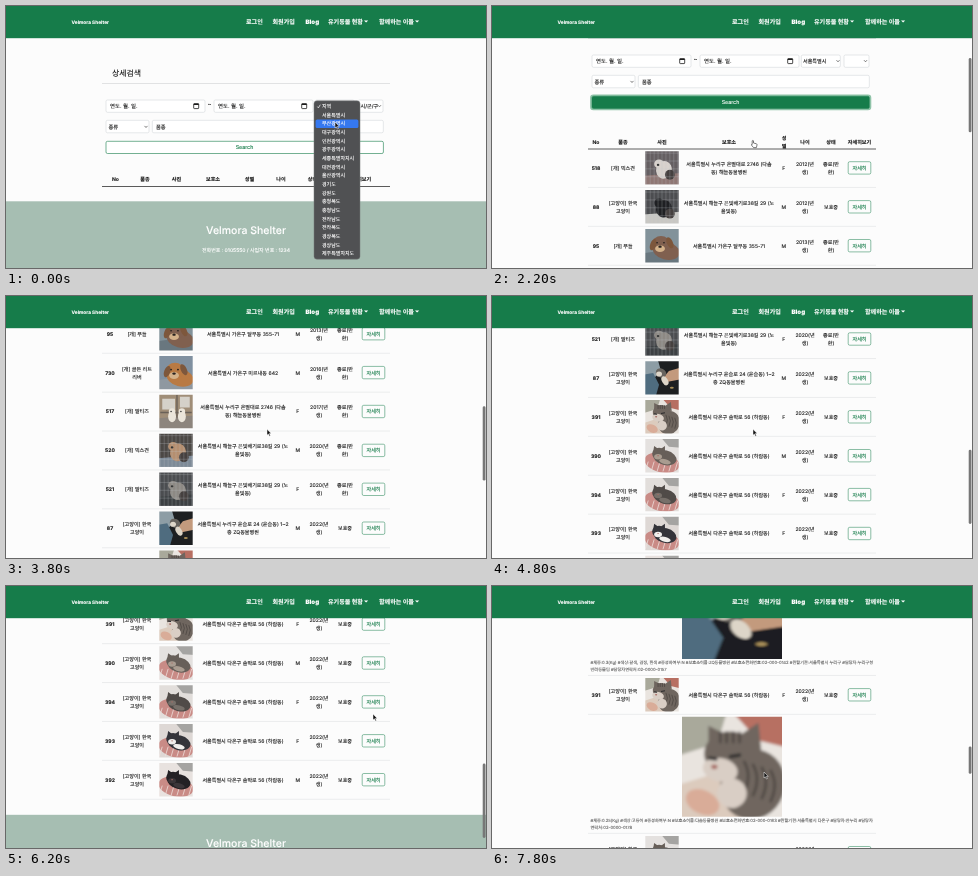
An HTML page that plays this animation: 480x262 px, repeating every 8000 ms.

```html
<!DOCTYPE html>
<html lang="ko">
<head>
<meta charset="utf-8">
<title>상세검색</title>
<style>
html, body { margin: 0; width: 100%; height: 100%; overflow: hidden; background: #fcfcfc; }
svg { display: block; }
#stage { width: 100vw; height: 100vh; }
text {
  font-family: Inter, "Noto Sans CJK KR", "Noto Sans CJK JP", "Noto Sans CJK", sans-serif;
  fill: currentColor; stroke: currentColor; stroke-width: 0.12px;
  text-rendering: geometricPrecision; white-space: pre;
}
</style>
</head>
<body>
<script>
const LOOP = 8000, STEP = 200;
const GREEN = '#167c4a', INK = '#1c1c1c', BORDER = '#d3d7db';
const ROW = 38.9, FIRST_ROW = 207;

// ---------- drawing helpers ----------
function el(parent, tag, attrs = {}, content) {
  const node = document.createElementNS('http://www.w3.org/2000/svg', tag);
  for (const key in attrs) node.setAttribute(key, attrs[key]);
  if (content !== undefined) node.textContent = content;
  parent.appendChild(node);
  return node;
}
const group = (parent, y = 0) => el(parent, 'g', { transform: `translate(0 ${y})` });
const box = (parent, x, y, w, h, fill, more = {}) =>
  el(parent, 'rect', { x, y, width: w, height: h, fill, ...more });
const path = (parent, d, fill, more = {}) => el(parent, 'path', { d, fill, ...more });
const oval = (parent, cx, cy, rx, ry, fill, angle = 0) =>
  el(parent, 'ellipse', { cx, cy, rx, ry, fill, transform: `rotate(${angle} ${cx} ${cy})` });
const stroke = (parent, d, color, width, more = {}) =>
  path(parent, d, 'none', { stroke: color, 'stroke-width': width, ...more });
const rule = (parent, y, color, width = 0.5) => stroke(parent, `M96 ${y}H384`, color, width);

function label(parent, x, y, content, size = 5.1, more = {}) {
  return el(parent, 'text', { x, y, dy: '.36em', 'font-size': size, color: INK, ...more }, content);
}
function centered(parent, x, y, content, size = 5.1, more = {}) {
  const lines = content.split('\n');
  lines.forEach((line, i) =>
    label(parent, x, y + (i - (lines.length - 1) / 2) * 8, line, size, { 'text-anchor': 'middle', ...more }));
}
const field = (parent, x, y, w, h) =>
  box(parent, x, y, w, h, '#fff', { rx: 1.5, stroke: BORDER, 'stroke-width': 0.6 });
const chevron = (parent, x, y) => stroke(parent, `M${x - 1.5} ${y - 0.8}l1.5 1.6 1.5-1.6`, '#444', 0.7);
const show = (node, on) => node.setAttribute('visibility', on ? 'visible' : 'hidden');
const moveTo = (node, x, y) => node.setAttribute('transform', `translate(${x} ${y})`);

// ---------- photos, drawn in a 34 x 34 space ----------
const scenes = {
  cage(p, fur, floor) {
    path(p, 'M-4 25L38 22V38H-4Z', floor);
    oval(p, 19, 19, 8, 9, fur, 15);
    oval(p, 14, 13, 5, 4.5, fur);
    oval(p, 25, 24, 5, 5, '#45403f');
    oval(p, 13, 14, 1.3, 1.1, '#222');
    for (let i = 1; i < 34; i += 4)
      stroke(p, `M${i} 0V34M0 ${i * 2}H34`, '#c3c6c9', 0.5, { opacity: 0.5 });
  },
  dog(p, fur, floor) {
    path(p, 'M-4 25L38 19V38H-4Z', floor);
    oval(p, 21, 22, 14, 9, fur, 15);
    oval(p, 16, 15, 9, 8, fur);
    oval(p, 8, 16, 3, 6, '#7d573c', 20);
    oval(p, 25, 14, 3, 6, '#7d573c', -25);
    oval(p, 15, 20, 5, 3.5, '#d4b28a');
    oval(p, 15, 18, 1.7, 1.2, '#28221f');
    oval(p, 12, 14, 1, 0.8, '#28221f');
    oval(p, 19, 14, 1, 0.8, '#28221f');
  },
  pair(p, fur, floor) {
    path(p, 'M-4 24L38 21V38H-4Z', floor);
    path(p, 'M3 4H16V15H3ZM21 2H31V13H21Z', '#d5d1c9');
    stroke(p, 'M18 0V23M1 18H33', '#6a6158', 1.4);
    for (const x of [13, 23]) {
      oval(p, x, 22, 4, 6, fur);
      oval(p, x, 17, 3.3, 3.2, fur);
      oval(p, x - 1, 17, 0.8, 0.7, '#333');
    }
  },
  held(p, fur, hand) {
    path(p, 'M-4 -4H12L16 10 8 18 -4 14Z', '#8d9da5');
    path(p, 'M-4 14L8 12 14 24 10 38H-4Z', '#4f6c7f');
    path(p, 'M38 6L24 10 19 16 23 21 38 18Z', hand);
    oval(p, 16, 12, 5.5, 4.5, '#67635e', 25);
    oval(p, 14, 13, 3, 2.6, fur);
    oval(p, 20, 20, 3, 5, fur, -30);
    oval(p, 27, 27, 2, 1, '#a98f58');
  },
  kitten(p, fur, pale) {
    path(p, 'M-4 -4H16L12 9 -4 14Z', '#a9a99b');
    path(p, 'M15 -4H38V11L26 8Z', '#b76f62');
    path(p, 'M-4 24L12 19 24 38H-4Z', '#dccbbd');
    oval(p, 24, 23, 11, 12, fur, 20);
    path(p, 'M9 12L9 3 15 6ZM20 6L26 2 27 12Z', fur);
    oval(p, 17, 13, 9.5, 8, fur, 10);
    for (let i = 0; i < 4; i++)
      stroke(p, `M${21 + i * 3} ${15 + i}q3 5 0 11M${13 + i * 2.2} 5v4`, '#34302d', 0.8, { opacity: 0.6 });
    oval(p, 13, 18, 6, 4, pale, 12);
    oval(p, 17, 26, 5, 5, pale, 25);
    stroke(p, 'M9 14l3 .4M16 13.6l4-.7', '#2b2a2c', 1.1);
    oval(p, 11, 17, 1.1, 0.8, '#a76d66');
    oval(p, 7, 29, 6, 4, '#d9ac98', 25);
  },
  curled(p, fur, pale) {
    path(p, 'M14 -4H38V9L24 8Z', '#a5a4a2');
    oval(p, 17, 24, 18, 10, '#c98b86', 12);
    for (let i = 0; i < 6; i++) stroke(p, `M${i * 6} 33l3-10`, '#efe0dc', 1, { opacity: 0.8 });
    oval(p, 20, 19, 12, 7.5, fur, 14);
    path(p, 'M8 13L9 7 13 10ZM16 10L20 7 20 14Z', fur);
    oval(p, 14, 15, 7, 6, fur);
    oval(p, 13, 18, 4, 2.8, pale);
    oval(p, 20, 23, 6, 2.5, pale, 14);
    oval(p, 13, 17, 0.8, 0.6, '#a76d66');
  }
};
function photo(parent, x, y, w, h, [scene, back, ...colors]) {
  const frame = el(parent, 'svg', { x, y, width: w, height: h, viewBox: '0 0 34 34', preserveAspectRatio: 'none' });
  const picture = el(frame, 'g', { filter: 'url(#soft)' });
  box(picture, -4, -4, 42, 42, back);
  scenes[scene](picture, ...colors);
}

// ---------- content ----------
const regions = ['지역', '서울특별시', '부산광역시', '대구광역시', '인천광역시', '광주광역시', '세종특별자치시',
  '대전광역시', '울산광역시', '경기도', '강원도', '충청북도', '충청남도', '전라남도', '전라북도', '경상북도',
  '경상남도', '제주특별자치도'];
const places = {
  haeneul: '서울특별시 누리구 온별대로 2746 (다솜\n동) 해늘동물병원',
  noeul: '서울특별시 해늘구 은빛배기로38길 29 (노\n을빛동)',
  dalmu: '서울특별시 가온구 달무동 355-71',
  mirnae: '서울특별시 가온구 미르내동 642',
  yunseul: '서울특별시 누리구 윤슬로 24 (윤슬동) 1~2\n층 ZQ동물병원',
  haram: '서울특별시 다온구 솔막로 56 (하람동)'
};
const CAT = '[고양이] 한국\n고양이', DONE = '종료(반\n환)', KEPT = '보호중';
const animals = [
  [518, '[개] 믹스견', 'haeneul', 'F', 2012, DONE, ['cage', '#655f62', '#d8d2cd', '#8f7774']],
  [88, CAT, 'noeul', 'M', 2012, KEPT, ['cage', '#4c4d50', '#1f2023', '#c9c8c4']],
  [95, '[개] 푸들', 'dalmu', 'M', 2013, DONE, ['dog', '#82929a', '#80604f', '#69777f']],
  [730, '[개] 골든 리트\n리버', 'mirnae', 'M', 2016, DONE, ['dog', '#8090a0', '#b97a43', '#8f98a0']],
  [517, '[개] 말티즈', 'haeneul', 'F', 2017, DONE, ['pair', '#a08e78', '#ebe5da', '#8d857d']],
  [520, '[개] 믹스견', 'noeul', 'M', 2020, DONE, ['cage', '#4c4845', '#b58f70', '#7d8a97']],
  [521, '[개] 말티즈', 'noeul', 'F', 2020, DONE, ['cage', '#4b4d50', '#8d8984', '#3c4043']],
  [87, CAT, 'yunseul', 'M', 2022, KEPT, ['held', '#1d1f21', '#ddd5c8', '#c39a7d']],
  [391, CAT, 'haram', 'F', 2022, KEPT, ['kitten', '#e9e4df', '#6f665f', '#d9cec5']],
  [390, CAT, 'haram', 'M', 2022, KEPT, ['curled', '#e4e1df', '#675f59', '#a99c90']],
  [394, CAT, 'haram', 'F', 2022, KEPT, ['curled', '#e2dedb', '#504b48', '#77706a']],
  [393, CAT, 'haram', 'F', 2022, KEPT, ['curled', '#ded8d5', '#34343a', '#f0eeec']],
  [392, CAT, 'haram', 'M', 2022, KEPT, ['curled', '#e8e2df', '#242125', '#3c363a']]
];
const notes = {
  early: ['#체중:0.3(Kg) #색상:갈색, 검정, 흰색 #중성화여부:N #보호소이름:ZQ동물병원 #보호소전화번호:02-000-0142 #관할기관:서울특별시 누리구 #담당자:누리구청',
    '반려동물팀 #담당자연락처:02-0000-0157'],
  late: ['#체중:0.25(Kg) #색상:고등어 #중성화여부:N #보호소이름:다솜동물병원 #보호소전화번호:02-000-0163 #관할기관:서울특별시 다온구 #담당자:한누리 #담당자',
    '연락처:02-0000-0178']
};
const photoHeight = i => i < 8 ? 72 : 100;
const detailHeight = i => photoHeight(i) + 19;

// ---------- scrolling page ----------
const stage = el(document.body, 'svg', { id: 'stage', viewBox: '0 0 480 262', preserveAspectRatio: 'none' });
el(el(stage, 'filter', { id: 'soft' }), 'feGaussianBlur', { stdDeviation: 0.5 });
box(stage, 0, 0, 480, 262, '#fcfcfc');
const page = group(stage);

label(page, 106, 67, '상세검색', 7.9, { 'font-weight': 500 });
rule(page, 77.5, '#c4c6c8');
for (const x of [100, 208]) {
  field(page, x, 94, 99, 12.3);
  label(page, x + 4, 100, '연도. 월. 일.', 5.4);
  box(page, x + 87.7, 97.8, 5, 4.8, 'none', { rx: 0.6, stroke: INK, 'stroke-width': 0.8 });
  box(page, x + 87.7, 97.5, 5, 1.5, INK);
}
label(page, 201.8, 98.5, '~', 5.5);
const regionBox = field(page, 309.3, 94, 39, 12.3);
const regionText = label(page, 311, 100, '지역');
chevron(page, 346, 100);
field(page, 352, 94, 25, 12.3);
const districtText = label(page, 354.5, 100, '시/군/구');
chevron(page, 373.5, 100);
field(page, 100, 114.3, 43, 12.5);
label(page, 102.5, 120.7, '종류', 5.3);
chevron(page, 140, 120.7);
field(page, 146.3, 114.3, 231, 12.5);
label(page, 150, 120.7, '품종', 5.3);

const glow = box(page, 99, 134.4, 279.4, 14, 'none', { rx: 2.4, stroke: '#8fc3a8', 'stroke-width': 1.8 });
const searchBox = box(page, 100, 135.3, 277.4, 12.2, '#fff', { rx: 1.5, stroke: GREEN, 'stroke-width': 0.6 });
const searchText = label(page, 238.5, 141.4, 'Search', 5.3, { 'text-anchor': 'middle' });

function tableHead(columns, y, names, lineY) {
  const head = group(page);
  names.forEach((name, i) => centered(head, columns[i], y, name, 5.1, { 'font-weight': 700 }));
  rule(head, lineY, '#333', 0.8);
  return head;
}
const emptyHead = tableHead([109.5, 139, 170.5, 207, 243.5, 275, 306.5, 353.5], 173.5,
  ['No', '품종', '사진', '보호소', '성별', '나이', '상태', '자세히보기'], 180.5);
const fullHead = tableHead([104, 131, 170, 237, 292, 313, 339, 367.5], 181,
  ['No', '품종', '사진', '보호소', '성\n별', '나이', '상태', '자세히보기'], 188);

const rows = animals.map(([id, kind, place, sex, year, state, picture], i) => {
  const row = group(page);
  centered(row, 104, 0, String(id), 5.1, { 'font-weight': 700 });
  centered(row, 131, 0, kind);
  photo(row, 153.3, -16.8, 33.4, 33.4, picture);
  centered(row, 237, 0, places[place]);
  centered(row, 291.7, 0, sex);
  centered(row, 313, 0, year + '(년\n생)');
  centered(row, 339, 0, state);
  box(row, 356.2, -6.3, 22.6, 12.4, 'none', { rx: 1.5, stroke: GREEN, 'stroke-width': 0.5 });
  centered(row, 367.5, 0, '자세히', 5.1, { color: GREEN });
  rule(row, ROW / 2, '#d8dadc');

  const detail = group(row, ROW / 2);
  const height = photoHeight(i);
  photo(detail, 190, 2.5, 100, height, picture);
  notes[i < 8 ? 'early' : 'late'].forEach((line, n) =>
    label(detail, 98.5, height + 6 + n * 7, line, 4.2, { color: '#666' }));
  rule(detail, detailHeight(i), '#d8dadc');
  return { row, detail };
});

const footer = group(page);
box(footer, 0, 0, 480, 90, '#a6beb2');
centered(footer, 240, 28.5, 'Velmora Shelter', 10.5, { color: '#fff', 'font-weight': 500 });
centered(footer, 240, 49, '전화번호 : 0105550 / 사업자 번호 : 1234', 5, { color: '#fff', 'font-weight': 500 });

// ---------- fixed layers ----------
const bar = group(stage);
box(bar, 0, 0, 480, 32.2, GREEN);
label(bar, 65.5, 16, 'Velmora Shelter', 4.8, { color: '#fff', 'font-weight': 700 });
[[240, '로그인'], [266.5, '회원가입'], [299.5, 'Blog'], [322, '유기동물 현황', 358], [373, '함께하는 이들', 409]]
  .forEach(([x, name, caret]) => {
    label(bar, x, 15.7, name, 6.1, { color: '#fff', 'font-weight': 900 });
    if (caret) path(bar, `M${caret} 14.4h4.2l-2.1 2.2Z`, '#fff');
  });

const thumb = box(stage, 476.7, 0, 2.8, 74, '#777', { rx: 1.4 });

const menu = group(stage);
box(menu, 308, 94.8, 46, 158.4, '#505153', { rx: 3, stroke: '#77787a', 'stroke-width': 0.5 });
const highlight = box(menu, 309.6, 0, 42.8, 8.6, '#3578f0', { rx: 1.6 });
const itemY = i => 100.3 + i * 8.66;
regions.forEach((name, i) => label(menu, 316, itemY(i), name, 5, { color: '#fff' }));
stroke(menu, 'M311.4 100.6l1 1.3 1.9-3.2', '#fff', 0.7);

const arrow = path(stage, 'M0 0V6L1.4 4.8 2.4 7 3.4 6.6 2.4 4.4H4.2Z', '#111', { stroke: '#fff', 'stroke-width': 0.5 });
const hand = path(stage, 'M-.8 3.4V-.2q.7-.8 1.3 0V2l3 .8q.6.3.5 1.2L3.4 6.6H.5L-1.6 4q0-.9.8-.6Z', '#fff',
  { stroke: '#111', 'stroke-width': 0.55 });

// ---------- motion ----------
const pointerX = [[0, 329], [200, 326], [400, 325], [600, 312], [800, 286], [1000, 273], [1200, 264], [1400, 261],
  [5400, 261], [5800, 318], [6200, 367], [6800, 367], [7200, 310], [7600, 272]];
const pointerY = [[0, 116], [400, 108], [600, 112], [800, 121], [1000, 127], [1200, 135], [2800, 135], [3000, 133.2],
  [5400, 133.2], [6200, 128], [6400, 118], [6800, 118], [7200, 160], [7600, 186]];
const scroll = [[0, 0], [1600, 0], [1800, 16], [2000, 38], [2200, 45], [2800, 45], [3000, 62], [3200, 110],
  [3400, 168], [3600, 217], [3800, 247], [4000, 262], [4200, 282], [4400, 325], [4600, 368], [4800, 397.3],
  [5000, 414], [5400, 436], [5800, 464], [6200, 480], [6599, 480], [6600, 1208], [6800, 1208], [7000, 1198],
  [7400, 1158], [7800, 1137.3]];

function at(keys, t) {
  const next = keys.findIndex(key => key[0] > t);
  if (next < 0) return keys[keys.length - 1][1];
  const [t0, a] = keys[next - 1], [t1, b] = keys[next];
  return a + (b - a) * (t - t0) / (t1 - t0);
}

function render(t) {
  const menuOpen = t < 600, filled = t >= 1400, expanded = t >= 6600;
  const pressed = t >= 1200, focused = t >= 600 && t < 1400;

  show(menu, menuOpen);
  highlight.setAttribute('y', itemY(t < 200 ? 2 : 1) - 4.1);
  regionText.textContent = regions[menuOpen ? 0 : 1];
  show(districtText, menuOpen);
  regionBox.setAttribute('stroke', focused ? '#3f78d8' : BORDER);
  regionBox.setAttribute('stroke-width', focused ? 1.3 : 0.6);
  searchBox.setAttribute('fill', pressed ? GREEN : '#fff');
  searchText.setAttribute('color', pressed ? '#fff' : GREEN);
  show(glow, filled);

  show(emptyHead, !filled);
  show(fullHead, filled);
  let y = FIRST_ROW;
  rows.forEach(({ row, detail }, i) => {
    row.style.display = filled ? '' : 'none';
    detail.style.display = expanded ? '' : 'none';
    moveTo(row, 0, y);
    y += ROW + (expanded ? detailHeight(i) : 0);
  });
  const footerY = filled ? y - 3.9 : 195.3;
  moveTo(footer, 0, footerY);

  const offset = at(scroll, t), total = footerY + 67;
  moveTo(page, 0, -offset);
  show(thumb, filled);
  thumb.setAttribute('y', 39 + offset * 224 / total);
  thumb.setAttribute('height', 220 * 262 / total);

  const overLink = (t >= 1200 && t < 3000) || (t >= 6400 && t < 7000);
  show(arrow, !overLink);
  show(hand, overLink);
  moveTo(overLink ? hand : arrow, at(pointerX, t), at(pointerY, t));
}

const start = performance.now();
function tick() {
  const t = (performance.now() - start) % LOOP;
  render(Math.floor(t / STEP) * STEP);
  requestAnimationFrame(tick);
}
tick();
</script>
</body>
</html>
```
